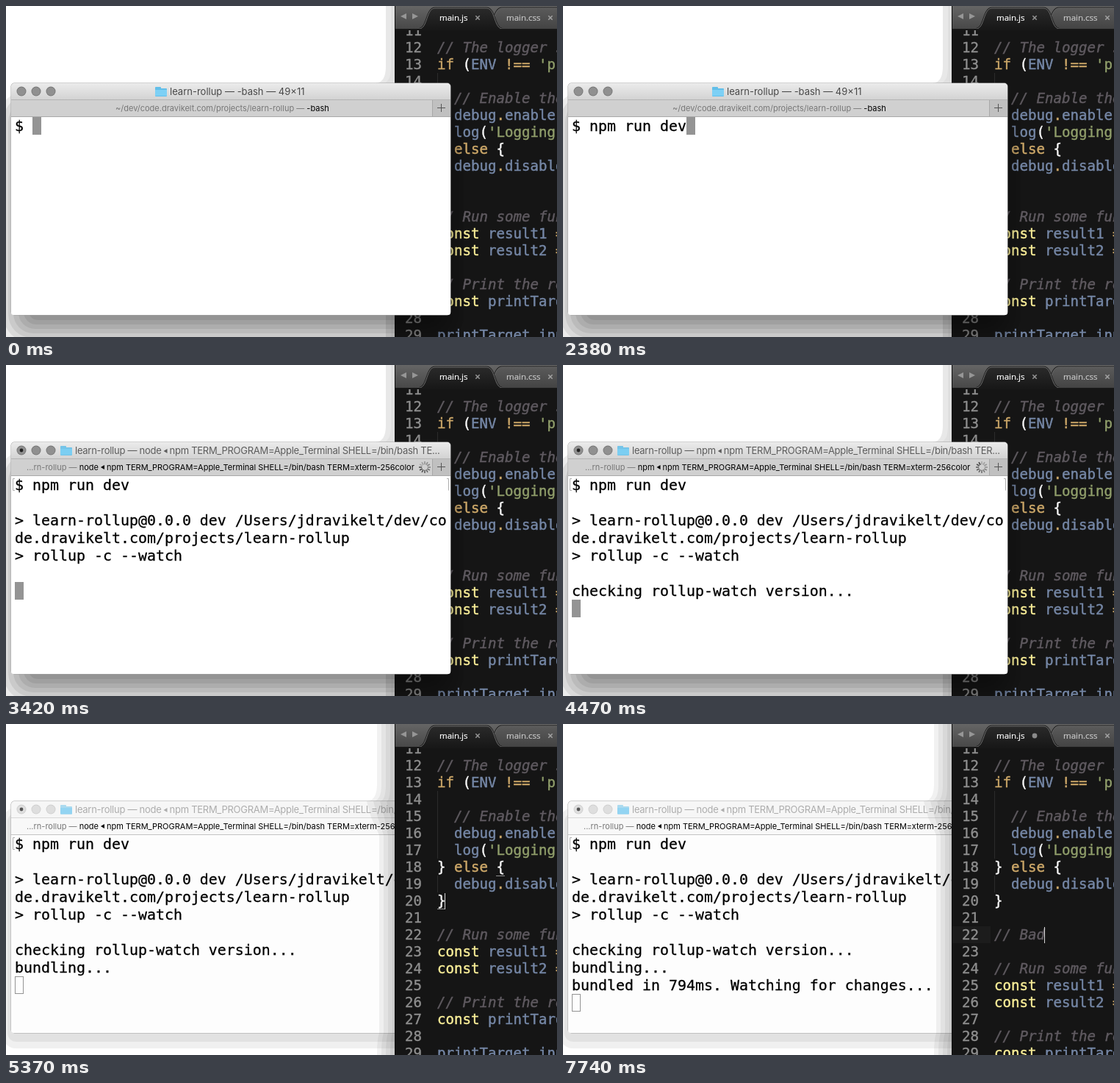
These frames come from a looping animation (750 by 450 pixels, 8 s). An HTML page with a canvas:

```html
<!DOCTYPE html>
<html lang="en">
<head>
<meta charset="utf-8">
<title>Terminal and editor</title>
<style>
html, body { margin: 0; width: 100%; height: 100%; overflow: hidden; background: #fff; }
canvas { display: block; }
</style>
</head>
<body>
<canvas id="stage" width="750" height="450"></canvas>
<script>
const ctx = document.getElementById('stage').getContext('2d');
const LOOP = 8000;
const MONO = '"DejaVu Sans Mono", "Liberation Mono", monospace';
const UI = 'Inter, "Open Sans", sans-serif';

// ---------- helpers ----------
function rect(x, y, w, h, color) {
  ctx.fillStyle = color;
  ctx.fillRect(x, y, w, h);
}

function shape(color, build) {
  ctx.beginPath();
  build();
  ctx.fillStyle = color;
  ctx.fill();
}

function disc(x, y, r, color) {
  shape(color, () => ctx.arc(x, y, r, 0, Math.PI * 2));
}

function line(points, color, width = 1) {
  ctx.beginPath();
  points.forEach(([x, y]) => ctx.lineTo(x, y));
  ctx.strokeStyle = color;
  ctx.lineWidth = width;
  ctx.stroke();
}

function cross(x, y, r, color) {
  line([[x - r, y - r], [x + r, y + r]], color, 1.6);
  line([[x - r, y + r], [x + r, y - r]], color, 1.6);
}

function gradient(y0, y1, from, to) {
  const g = ctx.createLinearGradient(0, y0, 0, y1);
  g.addColorStop(0, from);
  g.addColorStop(1, to);
  return g;
}

// "weight" thickens the glyphs slightly, like desktop font smoothing.
function text(str, x, y, font, color, weight = 0) {
  ctx.font = font;
  ctx.fillStyle = color;
  ctx.fillText(str, x, y);
  if (weight) {
    ctx.strokeStyle = color;
    ctx.lineWidth = weight;
    ctx.strokeText(str, x, y);
  }
  return x + ctx.measureText(str).width;
}

// Interface text; "<" becomes a small triangle. Returns the end position.
function label(str, x, y, font, color, spacing = 0) {
  ctx.letterSpacing = spacing + 'px';
  str.split('<').forEach((part, i) => {
    if (i) {
      const left = x + 3;
      shape(color, () => {
        ctx.moveTo(left, y - 4);
        ctx.lineTo(left + 5, y - 7);
        ctx.lineTo(left + 5, y - 1);
      });
      x += 11;
    }
    x = text(part, x, y, font, color);
  });
  ctx.letterSpacing = '0px';
  return x;
}

// Last value whose start time has been reached.
function at(steps, t) {
  let value = steps[0][1];
  for (const [start, v] of steps) if (t >= start) value = v;
  return value;
}

// ---------- terminal ----------
const TYPED = [[0, 0], [600, 1], [900, 2], [1050, 4], [1350, 5], [1500, 6],
  [1800, 7], [1950, 8], [2100, 9], [2250, 10], [2380, 11]];
const OUTPUT = ['', '',
  '> learn-rollup@0.0.0 dev /Users/jdravikelt/dev/co',
  'de.dravikelt.com/projects/learn-rollup',
  '> rollup -c --watch', '',
  'checking rollup-watch version...',
  'bundling...',
  'bundled in 794ms. Watching for changes...'];
const ROWS = [[0, 0], [2970, 1], [3270, 6], [4320, 7], [4770, 8], [5820, 9]];
const PROCESS = [[0, ''], [2970, 'npm'], [3270, 'node'], [4320, 'npm'], [4770, 'node']];
const ENV_VARS = '<npm TERM_PROGRAM=Apple_Terminal SHELL=/bin/bash ';

function folder(x, y) {
  shape('#62bfe9', () => {
    ctx.roundRect(x, y, 8, 5, 1);
    ctx.roundRect(x, y + 2, 16, 11, 1);
  });
  rect(x, y + 4, 16, 8, '#7dd0f5');
}

function spinner(x, y, t) {
  const head = Math.floor((t - 2970) / 150) * 2;
  for (let i = 0; i < 12; i++) {
    const a = i * Math.PI / 6;
    const age = (((head - i) % 12) + 12) % 12;
    const c = Math.cos(a), s = Math.sin(a);
    const g = 70 + age * 9;
    line([[x + c * 3.8, y + s * 3.8], [x + c * 8, y + s * 8]], `rgb(${g},${g},${g})`, 1.7);
  }
}

function terminalShadow(active) {
  const n = active ? 7 : 2;
  for (let i = 0; i < n; i++) {
    const left = active ? 31 - i * 7 : 2 - i * 6;
    const right = 612 - left;
    const top = active ? 150 - i * 6 : 121 - i * 7;
    const bottom = active ? 427 + i * 6 : 432 + i * 9;
    shape(`rgba(0,0,0,${active ? .075 : .06})`, () =>
      ctx.roundRect(left, top, right - left, bottom - top, 12 + i * 5));
  }
}

function terminalBars(t, active) {
  const proc = at(PROCESS, t);
  const bar = active ? gradient(105, 127, '#ebebeb', '#d3d3d3') : '#f6f6f6';
  rect(7, 105, 598, 22, bar);
  rect(7, 127, 598, 24, active ? '#d0d0d0' : '#f8f8f8');
  rect(7, 127, 598, 1, active ? '#b4b4b4' : '#d8d8d8');
  rect(7, 150, 598, 1, active ? '#a9a9a9' : '#c4c4c4');
  rect(580, 128, 25, 22, active ? '#c0c0c0' : '#eee');
  rect(580, 128, 1, 22, '#a8a8a8');
  line([[587, 138.5], [598, 138.5]], '#555');
  line([[592.5, 133], [592.5, 144]], '#555');

  for (let i = 0; i < 3; i++) {
    disc(21 + i * 20, 116, 6.5, active ? '#777' : '#cfcfcf');
    disc(21 + i * 20, 116, 5.6, active ? '#909090' : '#dedede');
  }

  const titleFont = '13px ' + UI, tabFont = '11px ' + UI;
  const titleColor = !active ? '#adadad' : proc ? '#5c5c5c' : '#484848';
  const gray = '#777';
  if (!proc) {
    folder(203, 110);
    label('learn-rollup — -bash — 49×11', 223, 121, titleFont, titleColor);
    const end = label('~/dev/code.dravikelt.com/projects/learn-rollup — ', 149, 143, tabFont, gray);
    label('-bash', end, 143, tabFont, '#000');
    return;
  }
  disc(21, 116, 2.4, active ? '#222' : '#555');
  ctx.globalAlpha = active ? .85 : .5;
  folder(74, 110);
  ctx.globalAlpha = 1;
  const tail = proc === 'npm' ? 'TER...' : 'TE...';
  label('learn-rollup — ' + proc + ENV_VARS + tail, 94, 121, titleFont, titleColor, -.27);
  const end = label('...rn-rollup — ', proc === 'npm' ? 30 : 28, 143, tabFont, gray);
  label(proc + ENV_VARS + 'TERM=xterm-256color', end, 143, tabFont, '#000');
  spinner(570, 139, t);
}

function terminal(t, active) {
  ctx.save();
  shape('#a2a2a2', () => ctx.roundRect(6.5, 104.5, 599, 316, 5));
  ctx.beginPath();
  ctx.roundRect(7, 105, 598, 315, [5, 5, 3, 3]);
  ctx.clip();
  rect(7, 105, 598, 315, active ? '#fff' : '#fdfdfd');
  terminalBars(t, active);

  const typed = at(TYPED, t);
  const rows = at(ROWS, t);
  const print = (str, row) => text(str, 12, 170 + row * 24, '19.93px ' + MONO, '#000', .3);
  print('$ ' + 'npm run dev'.slice(0, typed), 0);
  for (let r = 1; r < rows; r++) print(OUTPUT[r], r);

  const cx = rows ? 12 : 36 + typed * 12;
  const cy = 151 + rows * 24;
  if (active) {
    rect(cx, cy, 12, 24, '#949494');
  } else {
    ctx.strokeStyle = '#949494';
    ctx.lineWidth = 1;
    ctx.strokeRect(cx + .5, cy + .5, 11, 23);
  }
  if (rows) {
    line([[12, 154.5], [9.5, 154.5], [9.5, 170.5], [12, 170.5]], '#b0b0b0');
    line([[600, 154.5], [602.5, 154.5], [602.5, 170.5]], '#b0b0b0');
  }
  ctx.restore();
}

// ---------- editor ----------
const CODE = ['', '// The logger should only be', "if (ENV !== 'production'", '',
  '  // Enable the logger', '  debug.enable(', "  log('Logging is", '} else {',
  '  debug.disable()', '}', '', '// Run some functions', 'const result1 = say',
  'const result2 = add', '', '// Print the results', 'const printTarget', '',
  'printTarget.innerText'];
const TOKEN = /(\/\/.*)|('.*)|(const)|(if|else|[=!.]+)|(\w+)|(\S)/g;
const COLORS = ['#5f5a60', '#8f9d6a', '#f9ee98', '#cda869', '#7587a6', '#f8f8f8'];
const COMMENT = [[0, 0], [7000, 1], [7150, 2], [7300, 3], [7450, 4], [7600, 5], [7740, 6]];
const CODE_FONT = '19.1px ' + MONO;
const X0 = 587, ADV = 11.5, PITCH = 23;
const rowTop = n => 22 + (n - 11) * PITCH;

function codeLine(str, y) {
  for (const m of str.matchAll(TOKEN)) {
    const kind = m.slice(1).findIndex(Boolean);
    const style = kind === 0 ? 'italic ' : '';
    text(m[0], X0 + m.index * ADV, y, style + CODE_FONT, COLORS[kind], .45);
  }
}

function tab(left, right, color) {
  ctx.beginPath();
  ctx.moveTo(left - 4, 31);
  ctx.bezierCurveTo(left + 7, 30, left + 5, 3, left + 17, 3);
  ctx.lineTo(right - 17, 3);
  ctx.bezierCurveTo(right - 5, 3, right - 7, 30, right + 4, 31);
  ctx.strokeStyle = '#222';
  ctx.lineWidth = 3;
  ctx.stroke();
  ctx.fillStyle = color;
  ctx.fill();
  ctx.strokeStyle = '#6a6a6a';
  ctx.lineWidth = 1;
  ctx.stroke();
}

function tabBar(dirty) {
  rect(529, 0, 221, 31, gradient(0, 31, '#656565', '#484848'));
  tab(658, 780, gradient(3, 31, '#5a5a5a', '#444'));
  tab(567, 671, gradient(3, 31, '#2a2a2a', '#181818'));
  rect(529, 31, 221, 2, '#181818');
  for (const [x, d] of [[541, -1], [557, 1]]) {
    shape('#969696', () => {
      ctx.moveTo(x + 4 * d, 14);
      ctx.lineTo(x - 4 * d, 10);
      ctx.lineTo(x - 4 * d, 18);
    });
  }
  const font = '11.5px "Open Sans", "Noto Sans", sans-serif';
  text('main.js', 590, 20, font, '#fff', .2);
  text('main.css', 681, 20, font, '#c8c8c8', .2);
  if (dirty) disc(642, 16, 3.4, '#8a8a8a');
  else cross(642, 16, 2.7, '#929292');
  cross(741, 16, 2.7, '#a0a0a0');
}

function editorShadow(active) {
  const edges = active ? [505, 511, 517, 523] : [517, 524];
  edges.forEach((x, i) => {
    const alpha = active ? .055 : i ? .035 : .09;
    shape(`rgba(0,0,0,${alpha})`, () => {
      ctx.moveTo(x, 0);
      ctx.lineTo(x, 82);
      ctx.quadraticCurveTo(x, 104, x - 14 + i * 3, 105);
      if (active) {
        ctx.lineTo(x - 8 + i * 3, 127);
        ctx.lineTo(x + 3, 151);
        ctx.lineTo(x + 3, 420);
        ctx.quadraticCurveTo(x, 428, x, 450);
      } else {
        ctx.lineTo(x, 105);
        ctx.lineTo(x, 450);
      }
      ctx.lineTo(529, 450);
      ctx.lineTo(529, 0);
    });
  });
}

function editor(t, active) {
  const added = at([[0, 0], [6420, 1], [6560, 2]], t);
  const typed = at(COMMENT, t);
  const lines = CODE.slice();
  if (added) lines.splice(10, 0, ...['', '// Bad'.slice(0, typed)].slice(0, added));

  rect(529, 0, 221, 450, '#151515');
  if (added === 2) rect(529, rowTop(22), 53, PITCH, '#1c1c1c');
  line([[587.5, rowTop(14)], [587.5, rowTop(18)]], '#2b2b2b');
  line([[587.5, rowTop(19)], [587.5, rowTop(20)]], '#2b2b2b');
  lines.forEach((str, i) => {
    const y = rowTop(11 + i) + 18;
    text(String(11 + i), 543, y, CODE_FONT, '#8f8f8f', .35);
    codeLine(str, y);
  });

  if (active && !added) {
    line([[667, 206.5], [679, 206.5]], '#8f8f8f');
    line([[587, 251.5], [598, 251.5]], '#8f8f8f');
    if (t < 5970) rect(597, 230, 1, 22, '#d8d8d8');
  }
  if (added) {
    const row = 20 + added;
    rect(X0 - 1 + typed * ADV, rowTop(row) + 1, 1, 22, '#d8d8d8');
  }
  tabBar(added > 0);
  rect(529, 0, 1, 450, '#0d0d0d');
}

// ---------- playback ----------
function draw(t) {
  const editing = t >= 5370;
  rect(0, 0, 750, 450, '#fff');
  const showEditor = () => { editorShadow(editing); editor(t, editing); };
  const showTerminal = () => { terminalShadow(!editing); terminal(t, !editing); };
  if (editing) { showTerminal(); showEditor(); }
  else { showEditor(); showTerminal(); }
}

const start = performance.now();
function tick() {
  draw((performance.now() - start) % LOOP);
  requestAnimationFrame(tick);
}
tick();
</script>
</body>
</html>
```
